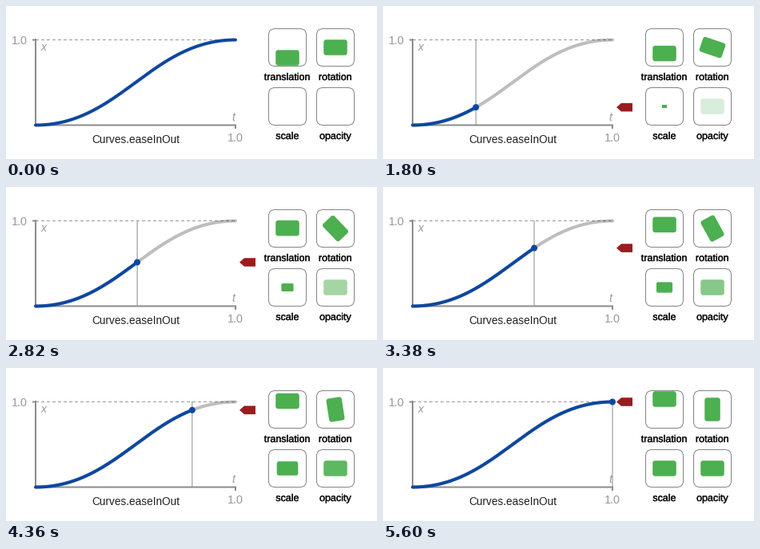
A matplotlib script that plays this animation: 464 px wide and 192 px high, repeating every 5620 ms.

```python
import numpy as np
import matplotlib.pyplot as plt
from matplotlib.animation import FuncAnimation
from matplotlib.patches import Circle, FancyBboxPatch, Polygon
from matplotlib.patheffects import withStroke
from matplotlib.transforms import Affine2D

W, H, DPI = 464, 192, 64
PX = 72 / DPI  # one pixel in points
STEPS = 120
TICK = 20  # ms
TICKS = 281

BLUE, GREEN, RED = "#0d47a1", "#4caf50", "#9b1c1f"
AXIS, MUTED, INK = "#8c8c8c", "#999999", "#111111"
X0, X1, Y0, Y1 = 37, 287, 149.5, 42.5

plt.rcParams["font.family"] = "Liberation Sans"
fig = plt.figure(figsize=(W / DPI, H / DPI), dpi=DPI, facecolor="white")
ax = fig.add_axes([0, 0, 1, 1])
ax.set(xlim=(0, W), ylim=(H, 0))
ax.axis("off")


def ease(t):
    """Cubic bezier (0.42, 0, 0.58, 1)."""
    s = np.linspace(0, 1, 2001)
    x = 1.26 * s * (1 - s) ** 2 + 1.74 * s**2 * (1 - s) + s**3
    return np.interp(t, x, 3 * s**2 - 2 * s**3)


def line(xs, ys, color, width, z, **kw):
    kw.setdefault("snap", False)
    return ax.plot(xs, ys, color=color, lw=width * PX, zorder=z, **kw)[0]


def label(x, y, text, size, color, **kw):
    ax.text(x, y, text, fontsize=size * PX, color=color, ha="center",
            va="baseline", zorder=6, **kw)


def rounded(x, y, w, h, r, z, **kw):
    style = f"round,pad=0,rounding_size={r}"
    return ax.add_patch(FancyBboxPatch((x, y), w, h, boxstyle=style, zorder=z, **kw))


def card(cx, cy, name):
    rounded(cx - 23.5, cy - 23.5, 47, 47, 8, 1, fc="white", ec="#858585", lw=PX)
    medium = [withStroke(linewidth=0.4 * PX, foreground=INK)]
    label(cx, cy + 41, name, 12.5, INK, path_effects=medium)
    return rounded(-14.75, -9.75, 29.5, 19.5, 3, 3, fc=GREEN, lw=0)


def place(patch, x, y, angle=0, scale=1):
    move = Affine2D().scale(scale).rotate_deg(angle).translate(x, y)
    patch.set_transform(move + ax.transData)


# Graph
line([X0, X1], [Y1, Y1], MUTED, 1, 1, ls=(0, (4, 3)), dash_capstyle="butt")
line([X0, X0], [42, 150], AXIS, 2, 1)
line([X0, X1], [Y0, Y0], AXIS, 2, 1)
line([33, 38], [Y1, Y1], AXIS, 2, 1, solid_capstyle="butt")
line([X1, X1], [Y0, 154], AXIS, 2, 1, solid_capstyle="butt")
label(17, 47.5, "1.0", 14.4, MUTED)
label(287, 170.5, "1.0", 14.4, MUTED)
label(47, 56, "x", 14, MUTED, style="italic")
label(284.5, 144, "t", 14.4, MUTED, style="italic")
label(162, 172, "Curves.easeInOut", 13.65, "#212121")

ts = np.linspace(0, 1, 2 * STEPS + 1)
cx = X0 + (X1 - X0) * ts
cy = Y0 + (Y1 - Y0) * ease(ts)
track = line(cx, cy, "black", 4, 3, alpha=0.26, solid_capstyle="round")
done = line(cx, cy, BLUE, 4, 4, solid_capstyle="round")
cursor = line([X0, X0], [Y1, Y0], AXIS, 1, 2)
dot = ax.add_patch(Circle((X0, Y0), 4, fc=BLUE, lw=0, zorder=5))
arrow = np.array([(292, 0), (298, -5.3), (312, -5.3), (312, 5.3), (298, 5.3)])
marker = ax.add_patch(Polygon(arrow, fc=RED, lw=0, zorder=5))

# Previews
slider = card(352, 52, "translation")
spinner = card(412, 52, "rotation")
grower = card(352, 126, "scale")
fader = card(412, 126, "opacity")
place(fader, 412, 126)


def step_at(tick):
    """Each 140 ms holds three steps of 20, 100 and 20 ms."""
    cycle, part = divmod(tick, 7)
    return 3 * cycle + (part > 0) + (part == 6)


def draw(tick):
    step = step_at(tick)
    running = step > 0
    i = 2 * step
    x, y, v = cx[i], cy[i], float(ease(ts[i]))

    end = i + 1 if running else len(ts)
    done.set_data(cx[:end], cy[:end])
    cursor.set_xdata([x, x])
    dot.center = x, y
    marker.set_xy(arrow + (0, y))
    for part in (track, cursor, dot, marker, grower):
        part.set_visible(running)

    place(slider, 352, 65 - 26 * v)
    place(spinner, 412, 52, angle=90 * v)
    place(grower, 352, 126, scale=max(v, 1e-4))
    fader.set_alpha(min(v, 1))
    return track, done, cursor, dot, marker, slider, spinner, grower, fader


anim = FuncAnimation(fig, draw, frames=TICKS, interval=TICK, repeat=True, repeat_delay=0)
plt.show()
```
